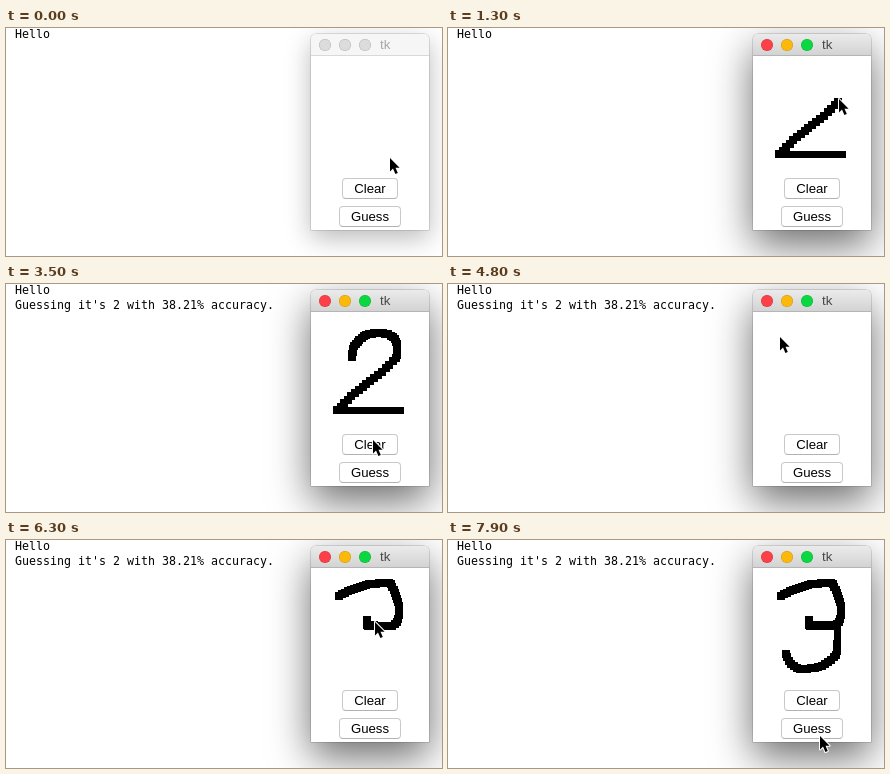
Recreate the animation shown at these times as an HTML page. Size 436x228 px, loop 8000 ms.

```html
<!DOCTYPE html>
<html lang="en">
<head>
<meta charset="utf-8">
<title>Digit guesser</title>
<style>
html, body { margin: 0; width: 100%; height: 100%; overflow: hidden; background: #fff; }
#stage { position: relative; width: 436px; height: 228px; overflow: hidden; background: #fff; }
pre { position: absolute; left: 9px; top: -1px; margin: 0; font: 11.63px/15px "DejaVu Sans Mono", monospace; color: #000; }
#win {
  position: absolute; left: 305px; top: 6px; width: 118px; height: 196px;
  border-radius: 5px 5px 0 0; background: #fff;
  box-shadow: 0 0 0 .5px rgba(0,0,0,.22), 0 8px 26px rgba(0,0,0,.28);
}
#win.on { box-shadow: 0 0 0 .5px rgba(0,0,0,.25), 0 15px 40px rgba(0,0,0,.58); }
#bar { height: 21px; border-radius: 5px 5px 0 0; background: #f6f6f6; border-bottom: 1px solid #d9d9d9; }
.on #bar { background: linear-gradient(#ebebeb, #d3d3d3); border-color: #b5b5b5; }
#bar i {
  position: absolute; top: 5px; width: 12px; height: 12px; border-radius: 50%;
  background: #dcdcdc; box-shadow: inset 0 0 0 .5px rgba(0,0,0,.2);
}
#bar b { position: absolute; left: 69px; top: 3px; font: 13.3px/16px "Liberation Sans", sans-serif; color: #a8a8a8; }
.on #bar b { color: #484848; }
.on #bar i { background: var(--c); }
.btn {
  position: absolute; box-sizing: border-box; height: 21px; border-radius: 4px;
  border: 1px solid #c9c9c9; border-bottom-color: #b2b2b2; background: #fff;
  font: 13.2px/19px "Liberation Sans", sans-serif; text-align: center; color: #000;
}
.btn.down { background: linear-gradient(#6cb3fa, #0a6cf5); border-color: #2a7de0; color: #fff; }
svg { position: absolute; left: 0; top: 0; }
</style>
</head>
<body>
<div id="stage">
  <pre id="log"></pre>
  <div id="win">
    <div id="bar">
      <i style="left:8px;--c:#fc3f48"></i><i style="left:28px;--c:#fdb90a"></i><i style="left:48px;--c:#0ad841"></i>
      <b>tk</b>
    </div>
    <div class="btn" id="clear" style="left:31px;top:144px;width:56px">Clear</div>
    <div class="btn" id="guess" style="left:28px;top:172px;width:62px">Guess</div>
  </div>
  <svg width="436" height="228">
    <path id="ink" shape-rendering="crispEdges"/>
    <path id="arrow" d="M0 0V13.4L3 10.6L5.4 16L7.8 15L5.5 9.7H9.6Z" stroke="#fff" stroke-width="2" stroke-linejoin="round" paint-order="stroke"/>
  </svg>
</div>
<script>
const LOOP = 8000, STEP = 100, SAMPLE = 25;
const ACTIVE = 300, ANSWER = 2900, WIPE = 4200;
const $ = id => document.getElementById(id);
const within = (t, a, b) => t >= a && t < b;

// One leg of the pointer's way; a pen size makes it draw.
function leg(from, to, d, pen = 0) {
  const path = document.createElementNS("http://www.w3.org/2000/svg", "path");
  path.setAttribute("d", d);
  const length = path.getTotalLength();
  const at = t => {
    const p = Math.min(1, Math.max(0, (t - from) / (to - from)));
    return path.getPointAtLength(length * (pen ? p : p * p * (3 - 2 * p)));
  };
  return { from, to, pen, at };
}

const legs = [
  leg(300, 550, "M383 129L394 123"),
  leg(550, 900, "M394 123H330.5", 7),
  leg(900, 1300, "M331 122L350 104 377 83 390 70", 8),
  leg(1300, 2000, "M390 70C394 53 388 45 372 45S346 56 346 69", 8),
  leg(2200, 2700, "M346 69L371 188"),
  leg(3100, 3450, "M371 188L366 155"),
  leg(WIPE, 4800, "M366 155L331 52"),
  leg(4900, 5700, "M333 52C348 43 360 39 385 39C387 46 393 56 393 66S391 82 383 82", 8),
  leg(5700, 6600, "M383 82H361V75V81H389", 8),
  leg(6600, 7000, "M389 82V100", 7),
  leg(7000, 7500, "M389 100V108C384 120 367 125 357 125S340 120 338 110", 8),
  leg(7600, 7900, "M338 110L371 195")
];

function pointer(t) {
  const begun = legs.filter(l => l.from <= t);
  return (begun.pop() || legs[0]).at(t);
}

function stamp({ at, pen }, t) {
  const { x, y } = at(t);
  return `M${Math.round(x - pen / 2)} ${Math.round(y)}h${pen}v${pen}h-${pen}z`;
}

function inkPath(t) {
  let d = "";
  for (const l of legs) {
    if (!l.pen || l.from > t || (t >= WIPE && l.from < WIPE)) continue;
    const end = Math.min(t, l.to);
    for (let u = l.from; u <= end; u += SAMPLE) d += stamp(l, u);
  }
  return d;
}

let shown = -1;
function draw(now) {
  const t = Math.floor(now % LOOP / STEP) * STEP;
  if (t === shown) return;
  shown = t;
  const { x, y } = pointer(t);
  $("arrow").setAttribute("transform", `translate(${Math.round(x) + 1} ${Math.round(y) + 1})`);
  $("ink").setAttribute("d", inkPath(t));
  $("win").className = t >= ACTIVE ? "on" : "";
  $("guess").classList.toggle("down", within(t, ANSWER - 200, ANSWER));
  $("clear").classList.toggle("down", within(t, WIPE - 200, WIPE));
  $("log").textContent = "Hello" + (t >= ANSWER ? "\nGuessing it's 2 with 38.21% accuracy." : "");
}

const start = performance.now();
function tick() {
  draw(performance.now() - start);
  requestAnimationFrame(tick);
}
tick();
</script>
</body>
</html>
```
